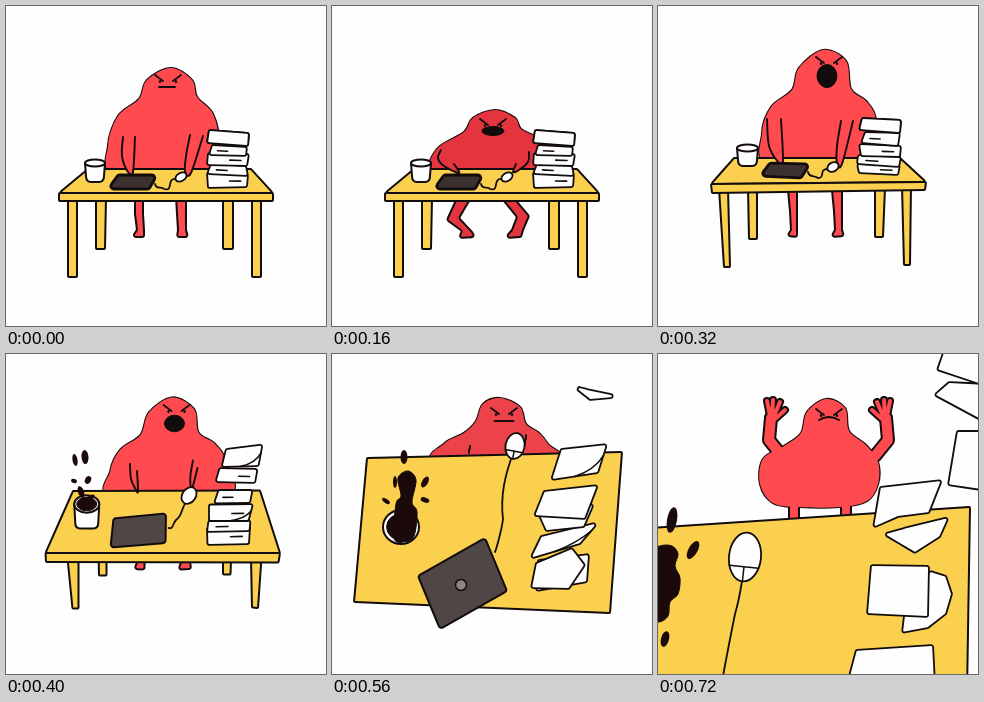
An HTML page with a canvas that plays this animation: 320x320 px, repeating every 0.8 s.

```html
<!DOCTYPE html>
<html lang="en">
<head>
<meta charset="utf-8">
<title>Table flip</title>
<style>
html, body { margin: 0; width: 100%; height: 100%; overflow: hidden; background: #fefefe; }
canvas { display: block; width: 320px; height: 320px; }
</style>
</head>
<body>
<canvas id="stage" width="320" height="320"></canvas>
<script>
const ctx = document.getElementById('stage').getContext('2d');
const INK = '#120c0c', WHITE = '#fefefe', WOOD = '#fbd04f', COFFEE = '#1c0909';
const STEP = 80;

// Shapes are point strings "x y x y ..." so that poses can be blended.
const stand = {
  red: 0,
  body: '110 168 102 140 112 110 133 93 141 74 165 62 186 74 191 91 207 108 213 138 206 168',
  face: [162, 73, 161, 81, 8, 0],
  feet: ['129 190 129 208 131 224 126 231 138 231 138 224 137 208 137 190',
         '170 190 171 208 172 224 171 231 182 231 180 224 180 208 180 190'],
  arms: ['117 131 116 150 122 166 127 166 129 131', '184 129 180 150 179 166 185 167 197 130'],
  posts: ['62 192 71 192 71 271 62 271', '246 192 255 192 255 271 246 271',
          '90 192 100 192 99 243 90 243', '217 192 227 192 227 243 217 243'],
  desk: ['82 163 245 163 267 187 53 187', '53 187 267 187 267 195 53 195'],
  cup: [89, 157, 10, 3.5, 19, 0],
  laptop: '112 169 151 169 143 183 102 183',
  logo: [124, 176, 0],
  cord: 'M149 178C150 184 156 180 158 183C168 186 160 172 170 173',
  mouse: [175, 171, 4, 6, 60],
  sheets: ['201 166 242 168 241 181 202 182', '205 158 240 160 242 170 201 168',
           '202 147 243 148 241 160 201 159', '206 139 241 141 240 150 203 149',
           '203 124 243 127 242 140 201 137', '203 124 243 127 242 140 201 137'],
  dash: 1
};

const squat = {
  ...stand,
  red: 1,
  body: '96 170 98 155 108 140 132 126 141 112 163 104 183 112 189 123 207 133 222 152 224 170',
  face: [161, 117, 161, 125, 11, 4.5],
  feet: ['126 190 115 214 130 225 127 232 143 231 140 226 127 212 140 190',
         '168 190 185 211 180 224 173 232 189 231 191 224 197 210 180 190'],
  arms: ['109 144 106 152 112 160 127 167 122 158', '197 146 196 156 187 164 181 166 184 158']
};

const shout = {
  red: 0,
  body: '112 158 104 128 113 101 134 84 141 62 165 44 188 55 193 83 209 96 218 116 211 158',
  face: [171, 55, 169, 70, 10, 11.5],
  feet: ['130 184 132 205 133 224 129 230 139 231 139 224 139 205 139 184',
         '174 184 176 205 177 224 173 231 186 230 184 224 184 205 184 184'],
  arms: ['109 113 111 140 120 156 125 157 123 113', '183 115 179 140 179 157 184 158 195 115'],
  posts: ['61 182 70 182 72 261 66 261', '244 180 253 180 252 259 246 259',
          '90 182 99 182 99 233 91 233', '217 182 227 182 225 231 217 231'],
  desk: ['76 152 242 152 268 176 53 178', '53 178 268 176 267 184 54 187'],
  cup: [89.5, 142, 10.5, 3.5, 18, 0],
  laptop: '112 157 152 158 143 172 102 170',
  logo: [125, 165, 0],
  cord: 'M150 166C151 172 157 169 160 172C168 172 160 163 170 163',
  mouse: [175, 161, 4.5, 6, 60],
  sheets: ['199 158 242 159 240 169 201 167', '200 149 243 151 241 161 199 158',
           '201 138 243 140 242 151 203 150', '207 126 242 127 240 140 203 137',
           '204 112 243 114 242 127 201 124', '204 112 243 114 242 127 201 124'],
  dash: 1
};

const lift = {
  red: 0,
  body: '102 128 105 105 116 90 135 78 145 55 167 43 188 55 192 74 208 83 221 98 230 128',
  face: [170, 55, 168, 69, 10, 5],
  feet: ['130 170 130 180 130 190 128 200 138 200 138 190 138 180 138 170',
         '174 170 174 180 174 190 172 200 184 200 184 190 184 180 184 170'],
  arms: ['139 107 139 110 139 114 139 118 139 121', '191 98 190 102 190 105 189 109 188 113'],
  posts: ['62 226 75 227 73 248 67 248', '246 227 258 227 252 249 246 248',
          '95 205 102 205 102 210 95 210', '217 205 224 205 224 210 217 210'],
  desk: ['58 122 266 121 280 222 26 220', '26 220 280 222 278 233 26 229'],
  cup: [72, 158, 14.5, 14, 31, 0],
  laptop: '103 172 168 161 176 206 107 217',
  logo: [140, 189, 5],
  cord: 'M175 182C184 179 176 170 180 160C186 150 190 145 190 134',
  mouse: [191, 122, 9, 12, 10],
  sheets: ['203 190 246 186 246 211 202 215', '205 184 246 182 246 193 203 198',
           '205 163 251 160 243 183 203 184', '218 146 251 145 248 158 213 162',
           '223 116 260 116 256 131 218 132', '236 78 270 67 263 97 230 102'],
  dash: 1, fold: 1, full: 1,
  drops: [[69, 106, 2.5, 6, -10], [79, 103, 3.5, 7, -5], [68, 127, 3, 2, 20],
          [82, 126, 3, 4, 25], [75, 138, 3, 6, -20], [85, 143, 4, 2, -20]]
};

const tip = {
  red: 2,
  body: '106 106 113 89 132 79 144 67 151 50 168 44 188 53 194 70 207 79 216 90 224 106',
  face: [172, 58, 172, 67, 9.5, 0],
  arms: ['138 92 138 94 137 96 137 98 137 99', '194 81 194 84 193 87 193 90 192 92'],
  desk: ['35 104 290 98 278 259 22 248'],
  cup: [69, 173, 18, 17, 0, 0],
  laptop: '86 222 153 184 175 237 108 275',
  logo: [129, 231, 5.5],
  cord: 'M163 198C164 196 170 175 171 165C168 140 174 120 179 105',
  mouse: [183, 92, 9.5, 13, 10],
  sheets: ['206 206 257 200 255 228 204 237', '204 209 240 194 253 211 237 235 199 234',
           '209 182 267 168 248 190 198 205', '205 157 262 150 252 173 214 177',
           '212 137 266 131 253 165 202 162', '229 95 275 90 266 119 219 126',
           '239 31 258 46 292 43 255 35'],
  fold: 1, full: 1,
  blob: '62 184 64 150 69 142 66 124 76 117 84 126 80 148 85 158 82 182 72 188',
  drops: [[72, 103, 3.5, 7, 0], [63, 128, 2, 6, 0], [93, 128, 3, 6, 30],
          [93, 146, 4.5, 2.5, 20], [54, 147, 4.5, 2, 35]]
};

const fling = {
  red: 2,
  body: '116 104 123 94 129 84 134 68 144 53 165 44 186 52 196 66 202 82 209 92 217 104',
  face: [172.5, 59, 173, 69, 10, -4],
  limbs: [['M114 72L120 94', 13], ['M112 72L104 68M112 70L107 60M115 70L116 58M118 71L125 63', 6]],
  axis: 337,
  desk: ['23 96 312 94 291 275 21 269'],
  cup: [65, 185, 18, 9, 40, -4],
  laptop: '48 249 129 226 137 288 52 313',
  logo: [92, 270, 7],
  cord: 'M136 238C140 215 145 195 150 178C152 165 156 145 159 131',
  mouse: [162, 117, 10, 15.5, 6],
  sheets: ['206 222 249 227 243 262 199 255', '220 205 270 206 252 236 217 239',
           '219 174 271 177 266 210 216 204', '235 156 278 152 271 174 232 171',
           '234 151 279 147 272 168 233 165', '236 146 280 142 273 163 234 160',
           '247 107 291 109 283 143 243 140', '264 44 310 53 282 84 253 67',
           '256 36 308 36 297 61 254 62', '279 12 315 18 309 37 270 32'],
  full: 1,
  blob: '57 187 56 181 68 172 77 168 80 159 89 156 91 164 84 170 82 182 72 193',
  more: '66 119 66 112 74 114 80 107 87 109 84 117 88 122 89 130 80 134 79 144 72 141 76 127',
  drops: [[71, 90, 2.5, 7, -15], [86, 69, 2, 6, 10], [93, 140, 3, 7, 30], [66, 155, 2.5, 4.5, 10]]
};

const leap = {
  red: 0,
  body: '141 153 115 149 102 130 105 105 126 92 143 79 149 58 168 45 187 54 191 77 208 91 220 108 220 130 209 147 182 153',
  face: [171, 59, 171, 66, 10, -4],
  limbs: [['M124 102L111 86L113 64', 12], ['M112 62L109 47M114 62L115 46M116 62L122 48M117 65L127 56', 6],
          ['M136 146V175', 10]],
  axis: 341 - 17 + 1,
  reach: 341,
  desk: ['-8 174 312 153 309 340 -8 340'],
  cord: 'M65 322C70 295 74 275 77 260C80 250 82 240 84 227',
  mouse: [87, 203, 16, 24.5, 6],
  sheets: ['198 296 275 291 277 330 189 330', '272 217 288 222 294 240 288 260 270 274 244 279 246 262',
           '213 211 271 212 270 263 209 260', '225 180 246 174 291 163 282 183 257 199',
           '222 133 284 126 271 159 240 163 215 174', '299 77 330 77 330 137 290 131',
           '291 28 276 41 330 70 330 30', '286 -4 279 16 330 33 330 -4'],
  blob: '-12 200 2 192 14 192 20 200 17 212 22 224 20 240 12 248 10 262 0 268 -14 262',
  drops: [[14, 166, 5, 13, 10], [35, 196, 4.5, 10, 30], [7, 285, 4, 8, 15]]
};

function mix(a, b, k) {
  if (typeof a === 'number') return a + (b - a) * k;
  if (Array.isArray(a)) return a.map((v, i) => mix(v, b[i], k));
  if (typeof a === 'string') {
    const ends = b.match(/-?[\d.]+/g);
    let i = 0;
    return a.replace(/-?[\d.]+/g, v => mix(+v, +ends[i++], k));
  }
  const out = { ...b };
  for (const key in a) if (key in b) out[key] = mix(a[key], b[key], k);
  return out;
}

const poses = [stand, mix(stand, squat, .5), squat, mix(squat, shout, .5), shout,
               mix(shout, lift, .5), lift, tip, fling, leap];
const REDS = ['#ff4a50', '#e4353f', '#ec434b'];

function pts(s) {
  const n = s.split(' ').map(Number), out = [];
  for (let i = 0; i < n.length; i += 2) out.push([n[i], n[i + 1]]);
  return out;
}
const between = (a, b, k) => [a[0] + (b[0] - a[0]) * k, a[1] + (b[1] - a[1]) * k];

// Polygon with softened corners
function poly(s, r = 2) {
  const p = pts(s), n = p.length, path = new Path2D();
  path.moveTo(...between(p[n - 1], p[0], .5));
  p.forEach((v, i) => path.arcTo(...v, ...p[(i + 1) % n], r));
  path.closePath();
  return path;
}

// Smooth curve through all points
function curve(s, closed = true) {
  const p = pts(s), n = p.length, path = new Path2D();
  const at = i => closed ? p[(i + n) % n] : p[Math.max(0, Math.min(n - 1, i))];
  path.moveTo(...p[0]);
  for (let i = 0; i < (closed ? n : n - 1); i++) {
    const [a, b, c, d] = [at(i - 1), at(i), at(i + 1), at(i + 2)];
    path.bezierCurveTo(b[0] + (c[0] - a[0]) / 6, b[1] + (c[1] - a[1]) / 6,
                       c[0] - (d[0] - b[0]) / 6, c[1] - (d[1] - b[1]) / 6, ...c);
  }
  return path;
}

function oval(x, y, rx, ry, deg = 0) {
  const path = new Path2D();
  path.ellipse(x, y, rx, ry, deg * Math.PI / 180, 0, 7);
  return path;
}

function line(path, w = 2, color = INK) {
  ctx.lineWidth = w;
  ctx.strokeStyle = color;
  ctx.stroke(path);
}

function paint(path, fill, w = 2) {
  ctx.fillStyle = fill;
  ctx.fill(path);
  if (w) line(path, w);
}

function drawBody(p, red) {
  const limbs = [];
  for (const [d, w] of p.limbs || []) {
    const path = new Path2D(d), flip = new Path2D();
    const sum = w === 10 ? p.axis - 1 : p.reach || p.axis;
    flip.addPath(path, new DOMMatrix([-1, 0, 0, 1, sum, 0]));
    limbs.push([path, w], [flip, w]);
  }
  const body = curve(p.body);
  line(body, 2.2);
  limbs.forEach(([path, w]) => line(path, w + 2));
  paint(body, red, 0);
  limbs.forEach(([path, w]) => line(path, w - 2, red));
}

function drawFace([x, y, mx, my, rx, ry]) {
  for (const s of [-1, 1]) {
    line(new Path2D(`M${x + s * 13} ${y - 4}L${x + s * 5} ${y + 2}`), 1.8);
    paint(oval(x + s * 8, y + 2.5, 1.2, 1.5), INK, 0);
  }
  if (ry > 0) paint(oval(mx, my, rx, ry), INK, 1);
  else line(new Path2D(`M${mx - rx} ${my}Q${mx} ${my + ry * 1.5} ${mx + rx} ${my}`), 1.9);
}

function drawCup([x, y, rx, ry, h, deg], full) {
  ctx.save();
  ctx.translate(x, y);
  ctx.rotate(deg * Math.PI / 180);
  if (h) {
    const r = Math.min(6, h / 3);
    paint(new Path2D(`M${-rx} 0L${1 - rx} ${h - r}Q${1 - rx} ${h} ${r - rx} ${h}L${rx - r} ${h}` +
                     `Q${rx - 1} ${h} ${rx - 1} ${h - r}L${rx} 0Z`), WHITE);
  }
  paint(oval(0, 0, rx, ry), WHITE);
  if (full) paint(oval(0, 0, rx * .8, ry * .78), COFFEE, 1);
  ctx.restore();
}

function drawMouse([x, y, rx, ry, deg]) {
  ctx.save();
  ctx.translate(x, y);
  ctx.rotate(deg * Math.PI / 180);
  paint(oval(0, 0, rx, ry), WHITE, 1.8);
  if (rx > 7) {
    const cy = ry * .4, cx = rx * .92;
    line(new Path2D(`M${-cx} ${cy}H${cx}M0 ${cy}V${ry}`), 1.5);
  }
  ctx.restore();
}

function drawSheet(s, i, p) {
  paint(poly(s), WHITE, 1.8);
  const [a, b, c, d] = pts(s);
  if (p.dash && i < 5) {
    const k = i % 2 ? .2 : .55, l = between(a, d, .55), r = between(b, c, .55);
    const from = between(l, r, k), to = between(l, r, k + .28);
    line(new Path2D(`M${from}L${to}`), 1.6);
  }
  if (p.fold && i % 3 === 2) {
    const m = between(b, c, .4), n = between(d, c, .5), q = between(m, n, .5);
    line(new Path2D(`M${m}Q${between(q, c, .6)} ${n}`), 1.5);
  }
}

function draw(p) {
  const red = REDS[Math.round(p.red)];
  ctx.fillStyle = WHITE;
  ctx.fillRect(0, 0, 320, 320);
  ctx.lineCap = ctx.lineJoin = 'round';

  (p.feet || []).forEach(s => paint(poly(s), red));
  drawBody(p, red);
  drawFace(p.face);
  (p.posts || []).forEach(s => paint(poly(s, 1), WOOD));
  p.desk.forEach(s => paint(poly(s, 1), WOOD));
  (p.arms || []).forEach(s => paint(curve(s, false), red, 1.9));

  if (p.cup) drawCup(p.cup, p.full);
  line(new Path2D(p.cord), 1.8);
  if (p.laptop) {
    paint(poly(p.laptop, 3), p.full ? '#514646' : '#3b3131', p.full ? 2 : 2.8);
    const [x, y, r] = p.logo;
    if (r > 3) paint(oval(x, y, r, r), '#8d8380', 1.5);
  }
  drawMouse(p.mouse);
  p.sheets.forEach((s, i) => drawSheet(s, i, p));

  for (const s of [p.blob, p.more]) if (s) paint(curve(s), COFFEE, 1);
  (p.drops || []).forEach(d => paint(oval(...d), COFFEE, 0));
}

let shown = -1;
function tick() {
  const step = Math.floor(performance.now() / STEP) % poses.length;
  if (step !== shown) draw(poses[shown = step]);
  requestAnimationFrame(tick);
}
tick();
</script>
</body>
</html>
```
